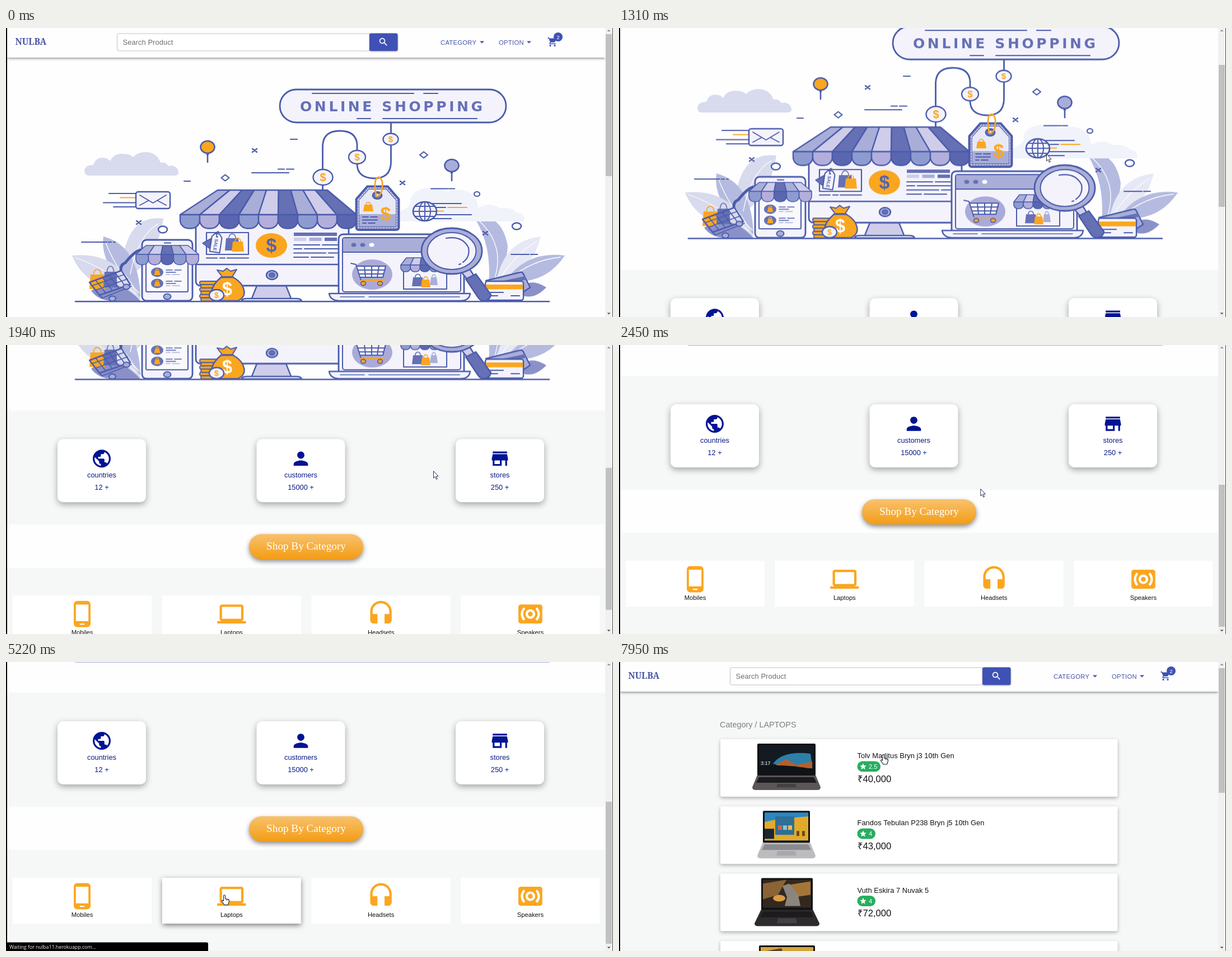
An HTML page with a canvas that plays this animation: 1084 by 517 pixels, repeating every 8000 ms.

```html
<!DOCTYPE html>
<html lang="en">
<head>
<meta charset="utf-8">
<title>Shop tour</title>
<style>
html, body { margin: 0; width: 100%; height: 100%; overflow: hidden; background: #fefefe; }
canvas { display: block; width: 1084px; height: 517px; }
</style>
</head>
<body>
<canvas id="stage" width="1084" height="517"></canvas>
<script>
const W = 1084, H = 517, LOOP = 8000, MAX_SCROLL = 490;
const SANS = '"Liberation Sans", Arial, sans-serif';
const INK = '#4a5bab', PALE = '#f4f3fb', LAV = '#cfcde9', MID = '#a9aed8', DARK = '#6570b5', ORANGE = '#fba61f';
const BLUE = '#3f51b5', NAVY = '#001494', GRAY = '#f6f8f8';
const stage = document.getElementById('stage').getContext('2d');
let c = stage;

const ICONS = {
  cart: 'M7 18c-1.1 0-1.99.9-1.99 2S5.9 22 7 22s2-.9 2-2-.9-2-2-2zM1 2v2h2l3.6 7.59-1.35 2.45c-.16.28-.25.61-.25.96 0 1.1.9 2 2 2h12v-2H7.42c-.14 0-.25-.11-.25-.25l.03-.12.9-1.63h7.45c.75 0 1.41-.41 1.75-1.03l3.58-6.49c.08-.14.12-.31.12-.48 0-.55-.45-1-1-1H5.21l-.94-2H1zm16 16c-1.1 0-1.99.9-1.99 2s.89 2 1.99 2 2-.9 2-2-.9-2-2-2z',
  search: 'M15.5 14h-.79l-.28-.27C15.41 12.59 16 11.11 16 9.5 16 5.91 13.09 3 9.5 3S3 5.91 3 9.5 5.91 16 9.5 16c1.61 0 3.09-.59 4.23-1.57l.27.28v.79l5 4.99L20.49 19l-4.99-5zm-6 0C7.01 14 5 11.99 5 9.5S7.01 5 9.5 5 14 7.01 14 9.5 11.99 14 9.5 14z',
  globe: 'M12 2C6.48 2 2 6.48 2 12s4.48 10 10 10 10-4.48 10-10S17.52 2 12 2zm-1 17.93c-3.95-.49-7-3.85-7-7.93 0-.62.08-1.21.21-1.79L9 15v1c0 1.1.9 2 2 2v1.93zm6.9-2.54c-.26-.81-1-1.39-1.9-1.39h-1v-3c0-.55-.45-1-1-1H8v-2h2c.55 0 1-.45 1-1V7h2c1.1 0 2-.9 2-2v-.41c2.93 1.19 5 4.06 5 7.41 0 2.08-.8 3.97-2.1 5.39z',
  person: 'M12 12c2.21 0 4-1.79 4-4s-1.79-4-4-4-4 1.79-4 4 1.79 4 4 4zm0 2c-2.67 0-8 1.34-8 4v2h16v-2c0-2.66-5.33-4-8-4z',
  store: 'M20 4H4v2h16V4zm1 10v-2l-1-5H4l-1 5v2h1v6h10v-6h4v6h2v-6h1zm-9 4H6v-4h6v4z',
  phone: 'M16 1H8C6.34 1 5 2.34 5 4v16c0 1.66 1.34 3 3 3h8c1.66 0 3-1.34 3-3V4c0-1.66-1.34-3-3-3zm-2 20h-4v-1h4v1zm3.25-3H6.75V4h10.5v14z',
  laptop: 'M20 18c1.1 0 1.99-.9 1.99-2L22 6c0-1.1-.9-2-2-2H4c-1.1 0-2 .9-2 2v10c0 1.1.9 2 2 2H0v2h24v-2h-4zM4 6h16v10H4V6z',
  headset: 'M12 1c-4.97 0-9 4.03-9 9v7c0 1.66 1.34 3 3 3h3v-8H5v-2c0-3.87 3.13-7 7-7s7 3.13 7 7v2h-4v8h3c1.66 0 3-1.34 3-3v-7c0-4.97-4.03-9-9-9z',
  speaker: 'M20 4H4c-1.1 0-2 .9-2 2v12c0 1.1.9 2 2 2h16c1.1 0 2-.9 2-2V6c0-1.1-.9-2-2-2zM7.76 16.24l-1.41 1.41C4.78 16.1 4 14.05 4 12c0-2.05.78-4.1 2.34-5.66l1.41 1.41C6.59 8.93 6 10.46 6 12s.59 3.07 1.76 4.24zM12 16c-2.21 0-4-1.79-4-4s1.79-4 4-4 4 1.79 4 4-1.79 4-4 4zm5.66 1.66l-1.41-1.41C17.41 15.07 18 13.54 18 12s-.59-3.07-1.76-4.24l1.41-1.41C19.22 7.9 20 9.95 20 12c0 2.05-.78 4.1-2.34 5.66zM12 10c-1.1 0-2 .9-2 2s.9 2 2 2 2-.9 2-2-.9-2-2-2z',
  star: 'M12 17.27L18.18 21l-1.64-7.03L22 9.24l-7.19-.61L12 2 9.19 8.63 2 9.24l5.46 4.73L5.82 21z'
};

// Drawing helpers
function paint(p, fill, stroke, lw = 2.4) {
  if (fill) { c.fillStyle = fill; c.fill(p); }
  if (stroke) { c.strokeStyle = stroke; c.lineWidth = lw; c.stroke(p); }
}
const shape = (d, fill, stroke, lw) => paint(new Path2D(d), fill, stroke, lw);
function box(x, y, w, h, r, fill, stroke, lw) {
  const p = new Path2D();
  p.roundRect(x, y, w, h, r);
  paint(p, fill, stroke, lw);
}
function oval(x, y, rx, ry, fill, stroke, lw) {
  const p = new Path2D();
  p.ellipse(x, y, rx, ry, 0, 0, 7);
  paint(p, fill, stroke, lw);
}
// Horizontal strokes on one line: x1, x2, x1, x2, ...
function dashes(y, xs, color = INK, lw = 2.2) {
  for (let i = 0; i < xs.length; i += 2) shape(`M${xs[i]} ${y}H${xs[i + 1]}`, null, color, lw);
}
function text(s, x, y, font, color, align = 'left', spacing = 0) {
  c.font = font;
  c.fillStyle = color;
  c.textAlign = align;
  c.letterSpacing = spacing + 'px';
  c.fillText(s, x, y);
  c.letterSpacing = '0px';
}
function icon(name, cx, cy, size, color) {
  c.save();
  c.translate(cx - size / 2, cy - size / 2);
  c.scale(size / 24, size / 24);
  shape(ICONS[name], color);
  c.restore();
}
function shadowed(color, blur, dy, draw) {
  c.save();
  c.shadowColor = color;
  c.shadowBlur = blur;
  c.shadowOffsetY = dy;
  draw();
  c.restore();
}
const dollar = (x, y, size, color) => text('$', x, y + size * .35, `bold ${size}px ${SANS}`, color, 'center');

function coin(x, y, rx, ry, size) {
  oval(x, y, rx, ry, PALE, INK);
  dollar(x, y, size, ORANGE);
}
function bag(x, y, w, h, color) {
  const m = x + w / 2;
  shape(`M${m - w / 4} ${y + 4}Q${m - w / 4} ${y - h * .35} ${m} ${y - h * .35}T${m + w / 4} ${y + 4}`, null, color, 1.6);
  shape(`M${x + 2} ${y}H${x + w - 2}L${x + w} ${y + h}H${x}Z`, color);
}
function awning(tl, tr, top, bl, br, base, drop, n) {
  const roof = [MID, LAV, DARK], flap = ['#8d9bd0', '#b3aedb', '#5b66b0'];
  const a = (tr - tl) / n, b = (br - bl) / n, lw = drop > 20 ? 2.4 : 1.6;
  for (let i = 0; i < n; i++) {
    const x = bl + i * b;
    shape(`M${tl + i * a} ${top}h${a}L${x + b} ${base}H${x}Z`, roof[i % 3], INK, lw);
    box(x, base, b, drop, [0, 0, b * .42, b * .42], flap[i % 3], INK, lw);
  }
}
function balloon(x, y, color) {
  shape(`M${x} ${y + 11}V${y + 27}`, null, INK, 2.6);
  oval(x, y, 12.5, 11, color, INK, 2.6);
  shape(`M${x - 3} ${y + 14}L${x} ${y + 10}L${x + 3} ${y + 14}Z`, INK);
}

function leaves() {
  shape('M281 341Q228 334 212 395L217 445Q268 420 281 341Z', '#d8daee');
  shape('M174 373Q166 430 240 482Q238 390 174 373Z', '#b5bbe0');
  shape('M118 407Q140 466 240 486Q205 398 118 407Z', '#d8daee');
  shape('M152 470Q195 440 240 488H190Q165 488 152 470Z', '#8a91c9');
  shape('M837 340Q885 330 896 390Q894 435 862 458Q868 390 837 340Z', '#b5bbe0');
  shape('M955 373Q890 380 876 452Q938 440 955 373Z', '#e6e8f5');
  shape('M998 407Q930 398 892 452Q962 462 998 407Z', '#b5bbe0');
  shape('M965 464Q930 442 915 475Q940 490 965 464Z', '#8a91c9');
  shape('M272 350Q235 372 222 440M178 384Q200 440 238 474M124 411Q180 430 232 476M846 346Q892 390 872 450M948 382Q915 400 884 445M990 410Q940 415 900 448', null, '#fff', 1.3);
}
function sky() {
  shape('M149 264Q140 264 140 255Q142 244 156 245Q160 232 172 232Q182 232 186 238Q192 225 207 225Q222 225 227 231Q236 221 252 222Q270 224 276 241Q284 238 290 247Q300 244 306 252Q312 264 300 264Z', '#d8daee');
  shape('M700 346V330Q728 318 722 306Q730 285 760 286Q775 284 790 293Q815 283 835 300Q843 310 843 322Q862 310 882 322Q905 320 912 330Q928 332 925 346Z', '#f1f3fb');
  balloon(360, 213, ORANGE);
  balloon(796, 246, MID);
  dashes(199, [508, 520]); dashes(274, [318, 329]);
  dashes(259, [439, 505]); dashes(252.5, [486, 497, 501, 514]);
  dashes(383, [135, 180, 183, 188, 192, 195]); dashes(405, [902, 934, 937, 949]);
  dashes(287.5, [759, 790, 792, 801]);
  for (const [x, y] of [[444, 219], [237, 348], [708, 277], [856, 367]])
    shape(`M${x - 4} ${y - 3}l8 6m0-6l-8 6`, null, INK, 2.4);
  for (const [x, y] of [[391.5, 268], [746, 227]])
    shape(`M${x - 7} ${y}l7-5.5l7 5.5l-7 5.5Z`, null, INK, 2.2);
  oval(841, 297, 5, 4, '#fefefe', INK, 2.2);
  oval(280, 360.5, 8, 6, '#fefefe', INK);
  oval(912, 354.5, 8, 6, '#fefefe', INK);

  dashes(296, [184, 232]); dashes(303.5, [204, 231], ORANGE);
  dashes(312.5, [174, 232]); dashes(320, [192, 235]);
  box(232, 293, 61, 30, 4, PALE, INK);
  shape('M239 299L262.5 313L286 299M239 317L254 309M286 317L271 309', null, INK, 1.8);

  dashes(314, [762, 813]); dashes(321, [767, 785]); dashes(321, [789, 823], ORANGE);
  dashes(327.5, [770, 781], ORANGE); dashes(334, [766, 831]); dashes(341, [760, 795]);
  oval(748, 328, 21, 17, PALE, INK, 2.6);
  oval(748, 328, 10, 17, null, INK, 2);
  shape('M748 311V345M727 328H769M732 319H764M732 337H764', null, INK, 2);
}
function banner() {
  shape('M687.5 169V240Q687 269 657 269Q627 268 627 243V208Q625 184 596 184Q567 184 565.5 210V290', null, INK, 2.8);
  box(489, 110, 404, 59, 29.5, PALE, INK, 2.8);
  dashes(117, [547, 728, 746, 771]);
  dashes(162, [627, 651, 673, 841]);
  text('ONLINE SHOPPING', 525, 149, 'bold 25px "DejaVu Sans", sans-serif', DARK, 'left', 4.6);
  coin(687, 199, 13.5, 10.5, 15);
  coin(627, 231, 15, 12, 17);
  coin(566, 267, 17.5, 14, 20);
}
function monitor() {
  shape('M448 461H500L510 486H438Z', LAV, INK);
  shape('M420 488.5Q422 484 430 484H518Q527 484 528 488.5Z', PALE, INK);
  box(339, 335, 273, 126, 8, PALE, INK, 2.8);
  shape('M339 423H612', null, INK);
  oval(475, 442, 10, 8, MID, INK, 2.4);
  oval(475, 442, 5, 4, DARK, INK, 1.5);
  awning(378, 574, 290, 311, 626, 334, 24.5, 9);

  box(358, 366, 75, 39, 0, PALE, INK, 2.2);
  bag(391, 376, 26, 22, DARK);
  bag(403, 382, 22, 18, ORANGE);
  shape('M351 385L367 376L364 395Z', DARK, INK, 1.5);
  c.save();
  c.translate(375, 385);
  c.rotate(.15);
  shape('M-9 -11L-4 -17H4L9 -11V16H-9Z', PALE, INK, 2);
  oval(0, -12, 2, 2, DARK);
  c.rotate(Math.PI / 2);
  text('SALE', 3, 3, `bold 8px ${SANS}`, INK, 'center');
  c.restore();
  shape('M376 371Q374 364 380 364', null, INK, 1.6);
  dashes(411.5, [358, 377, 382, 391, 395, 433]);

  oval(474, 389, 28, 22, ORANGE);
  dollar(474, 388.5, 34, '#5663ae');
  box(514, 366, 77, 6, 0, DARK);
  [LAV, MID, DARK].forEach((k, i) => box(514 + i * 27.5, 375, 22, 6, 0, k));
  dashes(388, [514, 560, 565, 592], INK, 2);
  dashes(395, [514, 528, 533, 592], INK, 2);
  dashes(402.5, [514, 571, 576, 592], INK, 2);
  dashes(410, [514, 540, 545, 585], INK, 2);
}
function laptopScene() {
  box(594, 369, 224, 112, 8, PALE, INK, 2.8);
  box(601, 375, 211, 97, 4, PALE, INK, 2);
  box(602, 376, 209, 25, [4, 4, 0, 0], MID);
  shape('M601 401H812', null, INK, 2);
  [DARK, DARK, '#fff'].forEach((k, i) => oval(621 + i * 16, 388, 4.5, 3.6, k));
  shape('M577 475H829Q827 488 812 488H594Q579 487 577 475Z', PALE, INK);
  dashes(481, [597, 640, 648, 810], INK, 1.6);

  oval(654, 441, 36, 27, '#aaaad9');
  shape('M627 426H678L673 446H632Z', PALE);
  shape('M616 421L625 423L634 452H674M627 426H678L673 446H632M640 426L642 446M653 426V446M666 426L663 446M629 433H677M631 440H675', null, INK, 2);
  dashes(452, [633, 676], ORANGE);
  for (const x of [638, 668]) oval(x, 457, 4.5, 3.6, ORANGE, INK, 1.6);

  box(710, 430, 77, 37, 0, PALE, INK, 2);
  awning(715, 781, 411, 705, 791, 424, 12, 5);
  bag(725, 446, 21, 16, DARK);
  bag(757, 446, 14, 14, MID);
  bag(741, 450, 17, 14, ORANGE);

  shape('M857 452L918 437Q922 436 924 440L936 464L918 476Z', MID, INK);
  shape('M860 458L927 444L930 450L866 464Z', DARK);
  box(856, 453, 68, 34, 4, PALE, INK);
  box(857, 459, 66, 8.5, 0, ORANGE);
  dashes(473, [862, 888]); dashes(479, [862, 878, 902, 917], INK, 1.8);

  shape('M814 438L828 431L838 447L827 453Z', LAV, INK);
  shape('M821 449L839 440L866 477Q864 488 852 488Q846 487 843 482Z', DARK, INK);
  oval(796, 399, 54, 41, MID, INK, 2.8);
  oval(796, 399, 43.5, 33, PALE, INK, 2);
  shape('M786 376Q815 371 826 393Q829 410 816 419M812 422L809 423', null, INK, 2.2);
}
function tag() {
  shape('M625 306L645 283H682L702 306V356Q702 361.5 697 361.5H630Q625 361.5 625 356Z', DARK, INK, 2.8);
  shape('M631 308L648 289H679L696 308V355H631Z', '#e9e8f6');
  box(631, 333, 65, 22, 0, MID);
  c.setLineDash([3, 2]);
  shape('M629 307L647 286.5H680L698 307V357.5H629Z', null, PALE, 1.4);
  c.setLineDash([]);
  oval(663, 299.5, 8.5, 6.5, DARK, INK, 2);
  oval(663, 299.5, 3.5, 2.8, PALE);
  shape('M661 300Q655 268 666 267Q675 271 671 292Q668 300 663 301', null, ORANGE, 2.8);
  bag(638, 316, 18, 12, ORANGE);
  dollar(678, 332, 34, ORANGE);
  dashes(338, [637, 647, 651, 663], INK, 1.8);
  dashes(343.5, [637, 663], INK, 1.8);
  dashes(349, [637, 643, 647, 659], INK, 1.8);
}
function phoneScene() {
  shape('M205 433Q204 424 213 420Q232 396 243 397', null, INK, 5);
  bag(149, 441, 28, 26, ORANGE);
  bag(174, 436, 25, 28, DARK);
  shape('M149 455L206 434L222 459L167 478Z', null, INK, 2.4);
  shape('M160 451L178 474M172 446L190 470M184 442L202 466M195 438L213 462M154 461L211 441M160 469L217 449M167 478L172 483L224 462', null, INK, 1.8);
  for (const [x, y] of [[190, 484], [215, 463]]) oval(x, y, 6, 4.6, MID, INK, 2);

  box(243, 379, 90, 109, 8, PALE, INK, 2.8);
  box(250, 390, 75, 82, 2, '#f9f9fd', INK, 2);
  dashes(384.5, [283, 294]);
  oval(288, 480.5, 6.5, 5, MID, INK, 2);
  awning(250, 325, 389, 232, 344, 405, 18.5, 5);
  for (const y of [437, 457]) {
    oval(270, y, 11, 8.5, DARK);
    bag(264.5, y - 3, 11, 8, ORANGE);
    dashes(y - 4, [286, 297, 301, 313], INK, 1.6);
    dashes(y, [286, 303], INK, 1.6);
    dashes(y + 4, [286, 293, 297, 310], MID, 1.6);
  }

  for (let i = 5; i >= 0; i--) box(346 + (i % 2) * 2, 453 + i * 5.9, 31, 5.9, 2.5, ORANGE, INK, 1.8);
  shape('M384 446Q358 468 372 488H414Q432 480 422 461Q416 451 405 446Z', ORANGE, INK);
  shape('M386 445L377 433L388 435L394 430L401 435L412 432L404 445Z', ORANGE, INK, 2);
  dashes(446, [383, 407]);
  dollar(395, 466, 33, '#fff');
  coin(376, 478, 13, 10, 14);
}

const art = document.createElement('canvas');
art.width = W;
art.height = 545;
c = art.getContext('2d');
c.lineCap = c.lineJoin = 'round';
for (const part of [leaves, sky, banner, monitor, laptopScene, tag, phoneScene]) part();
shape('M124 489.3H970', null, INK, 2.6);
c = stage;

// Page parts
function header(right) {
  const wide = right > 1075, d = wide ? 11 : 0, left = wide ? 199.5 : 198, btn = wide ? 658 : 649;
  shadowed('rgba(0,0,0,.55)', 5, 1, () => box(2, -10, right - 2, 63, 0, '#fefefe'));
  text('NULBA', 16.5, 30, 'bold 15.5px "Noto Serif", serif', '#4553a2');
  box(left + .5, 10, btn - left, 31, 3, '#fff', '#c0c0c4', 1);
  text('Search Product', left + 10.5, 29.5, `12.8px ${SANS}`, '#6d6d70', 'left', .12);
  shadowed('rgba(0,0,0,.4)', 3, 1, () => box(btn, 9.5, 50.5, 31.5, 3, BLUE));
  icon('search', btn + 25, 25, 19.2, '#fff');
  for (const [label, x, caret] of [['CATEGORY', 776, 850], ['OPTION', 880, 934]]) {
    text(label, x + d, 29.5, `11.2px ${SANS}`, '#4453a8', 'left', .32);
    shape(`M${caret + d - 4} 23.5h8l-4 4Z`, BLUE);
  }
  icon('cart', 976 + d, 25, 19.2, BLUE);
  oval(986 + d, 16, 8, 8, BLUE);
  text('2', 986 + d, 19.6, `9.8px ${SANS}`, '#fff', 'center');
}
function scrollbar(y, h) {
  box(1070, 0, 13, H, 0, '#f1f1f1');
  box(1071, y, 11, h, 0, '#c1c1c1');
  shape('M1073.5 6L1076.5 3L1079.5 6Z', '#8a8aa0');
  shape('M1073.5 509.5h6l-3 3Z', '#505050');
}

const CATEGORIES = [['phone', 'Mobiles'], ['laptop', 'Laptops'], ['headset', 'Headsets'], ['speaker', 'Speakers']];
const FACTS = [['globe', 'countries', '12 +'], ['person', 'customers', '15000 +'], ['store', 'stores', '250 +']];

function home(scroll, hover) {
  c.save();
  c.translate(0, -scroll);
  header(1070);
  c.drawImage(art, 0, 0);
  box(2, 545, 1068, 204, 0, GRAY);
  FACTS.forEach(([name, label, count], i) => {
    const x = 92 + i * 355.5, m = x + 79;
    shadowed('rgba(0,0,0,.35)', 12, 4, () => box(x, 596, 158, 113, 10, '#fff'));
    icon(name, m, 631, 38.4, NAVY);
    text(label, m, 664.5, `12.8px ${SANS}`, '#0a1a86', 'center');
    text(count, m, 686.5, `12.8px ${SANS}`, '#0a1a86', 'center');
  });
  const g = c.createLinearGradient(0, 766, 0, 811);
  g.addColorStop(0, '#f8c26e');
  g.addColorStop(1, '#f49c14');
  shadowed('rgba(0,0,0,.45)', 8, 4, () => box(434, 766, 204, 45, 22.5, g));
  text('Shop By Category', 536, 794, '19.2px "Liberation Serif", Times, serif', '#fff', 'center');
  box(2, 826, 1068, 190, 0, GRAY);
  CATEGORIES.forEach(([name, label], i) => {
    const x = 12 + i * 266.8, m = x + 124;
    shadowed(i === hover ? 'rgba(0,0,0,.5)' : 'transparent', 9, 3, () => box(x, 876, 248, 82, 0, '#fff'));
    icon(name, m, 909, 51.2, ORANGE);
    text(label, m, 946, `11.2px ${SANS}`, '#111', 'center');
  });
  c.restore();
  scrollbar(11 + scroll * .488, 254);
}
function statusBubble(hover, waiting) {
  const host = 'nulba11.herokuapp.com';
  const label = waiting ? `Waiting for ${host}...` : `https://${host}/category/${CATEGORIES[hover][1].toUpperCase()}`;
  box(0, 501.5, 361, 16, [0, 3, 0, 0], '#000');
  text(label, 6, 513, '8.8px "Open Sans", sans-serif', '#f2f2f2');
}

const ITEMS = [
  { name: 'Tolv Marlitus Bryn j3 10th Gen', stars: '2.5', price: '₹40,000', cx: 299, screen: 52, base: 61, foot: 91, body: '#5b5658' },
  { name: 'Fandos Tebulan P238 Bryn j5 10th Gen', stars: '4', price: '₹43,000', cx: 299, screen: 42, base: 52, foot: 93, body: '#bcbbbd' },
  { name: 'Vuth Eskira 7 Nuvak 5', stars: '4', price: '₹72,000', cx: 300, screen: 46, base: 58, foot: 94, body: '#2d2b2c' },
  { name: '', stars: '4', price: '', cx: 300, screen: 50, base: 60, foot: 94, body: '#2d2b2c' }
];
const WALLPAPERS = [
  () => {
    box(3, 3, 98, 50, 0, '#131a22');
    shape('M28 36Q45 12 95 18L98 40L60 44Z', '#2d7fa8');
    shape('M36 36L52 28L70 38L98 32V44H30Z', '#b4602c');
    shape('M3 40Q50 36 101 46V53H3Z', '#0e1318');
    text('3:17', 6, 38, `9px ${SANS}`, '#fff');
  },
  () => {
    box(3, 3, 78, 50, 0, '#2b86c3');
    shape('M3 20L30 14L81 10V53H3Z', '#e2aa2a');
    box(22, 10, 34, 33, 1, '#2f6f95');
    for (let i = 0; i < 3; i++) box(27 + i * 9, 26, 7, 8, 0, ['#d9604a', '#8fc3da', '#e6c04e'][i]);
    box(60, 36, 5, 9, 0, '#6f4a1c');
    box(70, 36, 5, 9, 0, '#6f4a1c');
    box(3, 32, 17, 18, 0, '#1b2630');
  },
  () => {
    box(3, 3, 86, 50, 0, '#33281f');
    shape('M3 10L45 3L30 30L3 38Z', '#8a6434');
    shape('M50 12L88 6V30L60 34Z', '#a37638');
    oval(32, 36, 11, 6, '#d89b43');
    shape('M38 14L50 10L66 30L70 50H42L46 34Z', '#8b8580');
  },
  () => {
    box(3, 3, 94, 50, 0, '#d5a43b');
    shape('M3 12L40 5L60 53H3Z', '#5a4526');
  }
];

function product(item, i) {
  const y = 138 + i * 120.3, left = item.cx - item.screen;
  shadowed('rgba(0,0,0,.3)', 6, 2.5, () => box(181, y, 709.5, 103, 3, '#fff'));
  const { cx, base, foot, screen, body } = item;
  shape(`M${left} ${y + 64}H${cx + screen}L${cx + base} ${y + foot - 5}Q${cx + base} ${y + foot} ${cx + base - 6} ${y + foot}H${cx - base + 6}Q${cx - base} ${y + foot} ${cx - base} ${y + foot - 5}Z`, body);
  shape(`M${left + 3} ${y + 68}H${cx + screen - 3}L${cx + screen + 2} ${y + 78}H${left - 2}Z`, i === 1 ? '#8b8a8e' : '#1c1b1d');
  shape(`M${cx - 16} ${y + 80}H${cx + 16}L${cx + 18} ${y + foot - 5}H${cx - 18}Z`, i === 1 ? '#a9a8ab' : '#444144');
  box(left, y + 8, screen * 2, 57, 2, '#121214');
  c.save();
  c.translate(left, y + 8);
  WALLPAPERS[i]();
  c.restore();
  text(item.name, 425.5, y + 34, `12.8px ${SANS}`, '#111', 'left', .08);
  box(425.5, y + 39.5, item.stars.length > 1 ? 41.5 : 32.5, 18.8, 9.4, '#27ae60');
  icon('star', 436, y + 49, 14, '#fff');
  text(item.stars, 446, y + 53, `11px ${SANS}`, '#fff');
  text(item.price, 426, y + 76.5, `16.6px ${SANS}`, '#111');
}
function listing(loaded) {
  const right = loaded ? 1070 : 1083;
  box(2, 0, right - 2, H, 0, '#f6f8f7');
  header(right);
  if (!loaded) return;
  text('Category / LAPTOPS', 180, 117, `14.4px ${SANS}`, '#7a807d');
  ITEMS.forEach(product);
  scrollbar(11, 223);
}

function pointer(x, y, hand) {
  c.save();
  c.translate(x, y);
  if (hand) {
    shape('M-1.5 1.5Q0 -1 1.5 1.5V7L7 8Q9 9 8.4 12L6.5 18H0L-4.6 11.5Q-4.4 8.6 -1.5 11Z', '#fff', '#1c1f2c', 1.1);
    shape('M3.7 7.5V10.5M6 8V10.5', null, '#1c1f2c', .8);
  } else {
    shape('M.5 .5V13L3.3 10.4L5.3 15.2L7.3 14.4L5.3 9.7H9Z', '#fff', '#26304f', 1);
  }
  c.restore();
}

// Motion: [start, end, number of steps, target..., easing]
const linear = p => p, easeOut = p => 1 - (1 - p) ** 2, easeIn = p => p ** 1.22;
const smooth = p => p * p * (3 - 2 * p);
const MOVES = [
  [300, 760, 8, [763, 225], easeOut],
  [2450, 3200, 11, [85, 409], easeOut],
  [3270, 4070, 13, [930, 425], smooth],
  [4270, 4890, 10, [390, 412], smooth],
  [5110, 5280, 3, [390, 417], easeOut],
  [5430, 5430, 1, [430, 414], linear],
  [5670, 5730, 2, [566, 375], easeOut],
  [6560, 7300, 12, [575, 195], smooth],
  [7370, 7520, 3, [461, 166], easeOut],
  [7950, 7950, 1, [472, 165], linear]
];
const SCROLLS = [
  [1170, 1600, 7, [317], easeIn],
  [1860, 2130, 5, [MAX_SCROLL], easeOut]
];
function follow(track, from, t) {
  let at = from;
  for (const [a, b, n, to, ease] of track) {
    if (t < a) break;
    const k = t >= b ? n : Math.floor((t - a + 5) / ((b - a) / (n - 1))) + 1;
    const p = ease(Math.min(1, k / n));
    at = at.map((v, i) => v + (to[i] - v) * p);
  }
  return at;
}

function render(t) {
  const [x, y] = follow(MOVES, [1038, 502], t);
  const [scroll] = follow(SCROLLS, [0], t);
  let hand = false;
  c.fillStyle = '#fefefe';
  c.fillRect(0, 0, W, H);
  if (t < 5930) {
    const over = scroll === MAX_SCROLL && y >= 386 && y <= 468;
    const slot = Math.max(0, Math.min(3, Math.floor((x - 12) / 266.8)));
    hand = over && x - 12 - slot * 266.8 <= 248;
    home(scroll, hand ? slot : -1);
    if (over) statusBubble(slot, t >= 5110);
  } else {
    const loaded = t >= 6560;
    listing(loaded);
    hand = loaded && x > 181 && x < 890 && (y - 138) % 120.3 < 103 && y > 138;
  }
  box(0, 0, 2, H, 0, '#000');
  box(1083, 0, 1, H, 0, '#4a4a4a');
  if (t >= 150) pointer(x, y, hand);
}

const start = performance.now();
(function tick() {
  render((performance.now() - start) % LOOP);
  requestAnimationFrame(tick);
})();
</script>
</body>
</html>
```
